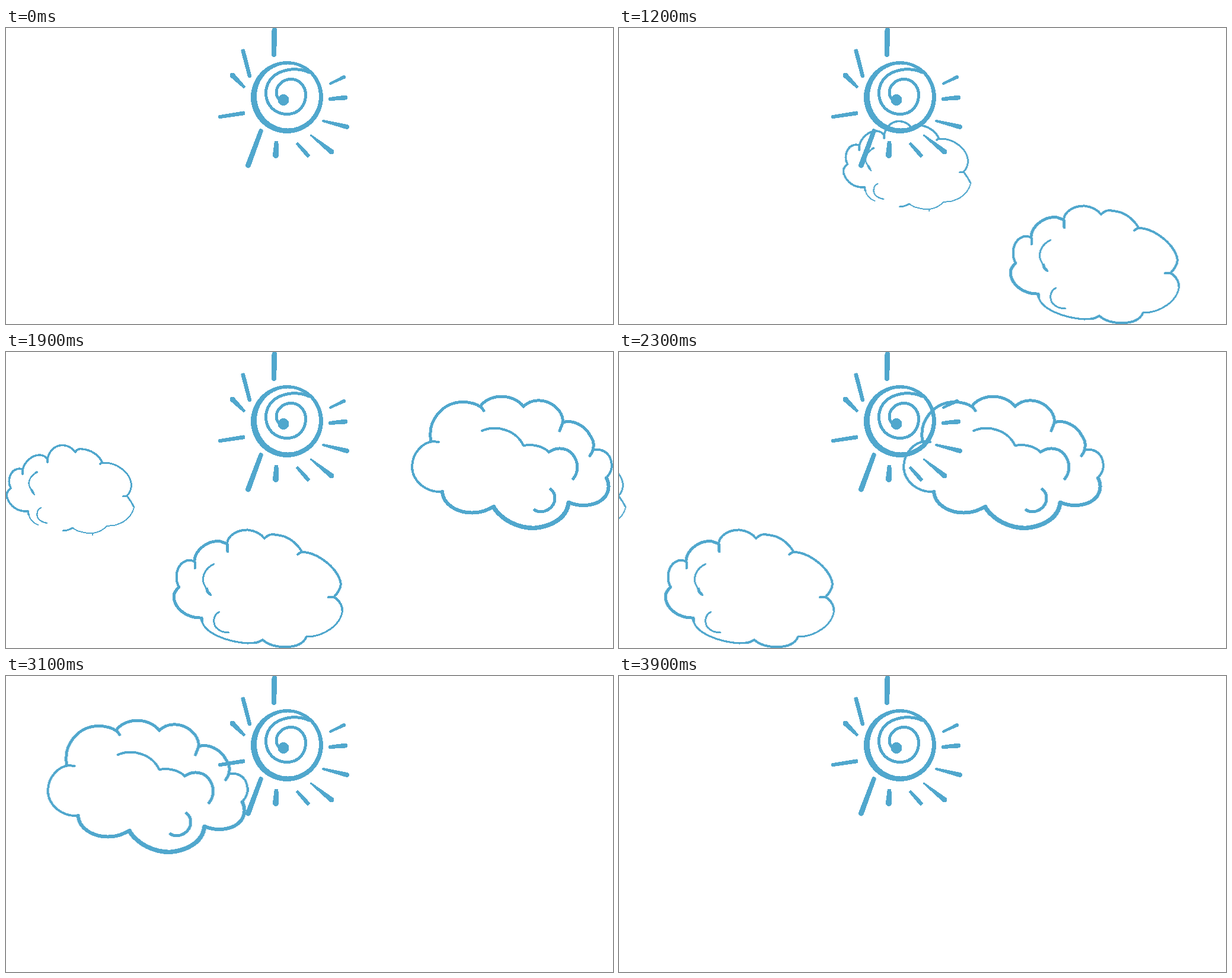
An HTML page for the animation above (4000 ms loop, 1024 by 500 pixels).

```html
<!DOCTYPE html>
<html lang="en">
<head>
<meta charset="utf-8">
<title>Sun and drifting clouds</title>
<style>
  html, body { margin: 0; width: 100%; height: 100%; overflow: hidden; background: #fff; }
  svg { display: block; width: 100vw; height: 100vh; }
  svg * { shape-rendering: crispEdges; }
  .ink { fill: none; stroke: #50a7cd; stroke-linecap: round; stroke-linejoin: round; }
  .solid { fill: #50a7cd; }

  /* One stage width in 19 steps, a second one in 20, then a short hold. */
  .sky { animation: drift 4s infinite; }
  @keyframes drift {
    0% { transform: translateX(1024px); animation-timing-function: steps(19, end); }
    47.5% { transform: translateX(0); animation-timing-function: steps(20, end); }
    97.5%, 100% { transform: translateX(-1024px); }
  }
</style>
</head>
<body>
<svg viewBox="0 0 1024 500" preserveAspectRatio="none">
  <g class="sun">
    <path class="solid" fill-rule="evenodd" d="M413 117a61 61 0 1 0 122 0a61 61 0 1 0 -122 0z
      M423 115.5a52.5 54 0 1 0 105 0a52.5 54 0 1 0 -105 0z"/>
    <path class="solid" d="M490 61L508 68L522 83L512 77L494 71L503 69z"/>
    <path class="ink" stroke-width="5" d="M511 75C500 69 481 68 467 73C448 79 438.500 94 438.500 110
      C438.500 131 454 145.500 474 145.500C494 145.500 505.500 131 505.500 113
      C505.500 97 494 86.500 481 86.500C466 86.500 456 98 456 109C456 114 458 118 462 121"/>
    <circle class="solid" cx="468" cy="121.500" r="9.500"/>
    <path class="solid" id="rays"/>
  </g>

  <g class="sky">
    <g class="ink small">
      <g stroke-width="3.500">
        <path d="M37 269C21 270 7 262 2 246C0 239 3 234 8 230M8 230C2 218 6 198 23 197L28 198L28 206"/>
        <path d="M28 200C31 184 45 174 57 174C63 174 67 177 70 181L70 186"/>
        <path d="M70 182C72 166 84 157 96 157.500C105 158 111 161 117 169
          C120 164 124 163 128 164C143 165 157 174 162 186L159 189"/>
        <path d="M37 269L38 274M1.500 237L1.500 247"/>
      </g>
      <g stroke-width="3">
        <path d="M159 188C182 183 211 202 211.500 226C211 234 208 239 204 243L197 244"/>
        <path d="M204 243C208 248 212 254 216 262"/>
        <path d="M96 302C104 302 108 299 113 297"/>
      </g>
      <path stroke-width="2" d="M216 262C213 276 202 287 188 291M186 292C180 294 175 293 170 294
        C160 305 145 309 128 304C122 303 117 301 113 297M146 306L146 309"/>
      <path stroke-width="2" d="M38 274C40 281 45 289 54 292"/>
      <path stroke-width="2.500" d="M51 204C43 208 37 217 39 225C40 231 45 234 44 236L48 241"/>
      <path stroke-width="4" d="M50 204L52 203M43 233L46 238"/>
      <path stroke-width="2.200" d="M59 263C51 267 51 277 55 282C59 287 64 288 69 289"/>
    </g>

    <g class="ink medium">
      <g stroke-width="5">
        <path d="M330 449C306 450 284 434 283 413C283 406 288 401 292 397M330 449L331 455"/>
        <path d="M318 352C319 335 340 317 362 320L373 324L374 337"/>
      </g>
      <g stroke-width="4">
        <path d="M292 397C281 379 291 349 313 352L319 355L319 365"/>
        <path d="M373 324C374 309 392 300 408 300.500C421 302 430 307 436 315
          C442 308 448 307 456 309C475 310 490 322 499 337L492 342"/>
        <path d="M496 339C516 333 561 362 565 392C564 401 559 408 553 414L544 414"/>
        <path d="M553 414C561 418 567 427 567.500 437"/>
        <path d="M507 481C502 492 490 498 473 498C456 499 441 494 433 486C429 489 424 491 419 491"/>
      </g>
      <path stroke-width="3" d="M567.500 437C565 461 536 481 507 481"/>
      <path stroke-width="3.200" d="M331 455C335 475 374 490 408 492L420 491"/>
      <path stroke-width="3" d="M351 358C336 365 331 378 333 389C334 395 339 398 338 403L346 411"/>
      <path stroke-width="4.500" d="M339 400L340 405L344 409"/>
      <path stroke-width="3" d="M360 439C349 444 349 458 354 465C360 472 368 474 376 474"/>
    </g>

    <g class="ink large">
      <g stroke-width="4">
        <path d="M730 152L720 151C703 153 685 170 685 195C686 216 706 238 736 236"/>
        <path d="M1013 212C1021 204 1024 193 1020 181C1016 169 1004 163 991 165"/>
        <path d="M803 133C829 122 861 133 873 158C891 155 907 160 916 169"/>
      </g>
      <g stroke-width="5">
        <path d="M985 175C992 166 994 153 986 142C976 123 956 114 939 119"/>
        <path d="M934 133L939 120C941 109 934 97 922 89C907 79 886 79 873 92
          C864 80 848 75 834 75C818 76 806 83 800 92"/>
        <path d="M806 99C799 87 780 84 768 84.500C736 86 710 116 717 151"/>
        <path d="M916 169C930 159 951 161 960 179C966 191 965 204 957 214"/>
        <path d="M919 232C929 240 929 257 915 266C907 271 898 271 892 267"/>
      </g>
      <g stroke-width="6">
        <path d="M736 236C737 256 759 271 785 271.500C803 272 813 266 823 261"/>
        <path d="M950 254C970 263 999 260 1011 244C1018 234 1018 222 1013 213"/>
      </g>
      <path stroke-width="7.500" d="M823 263C837 284 863 297 890 297.500C921 295 946 280 949 255"/>
    </g>
  </g>
</svg>
<script>
  // Each ray: x, y, width at one end, then at the other.
  const rays = [
    [453, 4, 9, 452, 45, 8],
    [400, 39, 7, 411, 81, 6.5],
    [382, 80, 9, 401, 99, 5],
    [361, 150, 6, 400, 144, 7],
    [430, 174, 7.5, 408.5, 232, 9],
    [456, 194, 7, 455, 215, 10],
    [492, 196, 5, 509, 215, 7],
    [514, 181, 3, 549, 209, 9],
    [535, 157, 4, 575, 167, 8],
    [547, 120, 6, 572, 117.5, 8],
    [547, 94, 4, 570, 83, 6]
  ];

  function taper([x1, y1, w1, x2, y2, w2]) {
    const len = Math.hypot(x2 - x1, y2 - y1);
    const nx = (y2 - y1) / len, ny = (x1 - x2) / len;
    const r1 = w1 / 2, r2 = w2 / 2;
    const at = (x, y, r) => `${x + nx * r} ${y + ny * r}`;
    return `M${at(x1, y1, r1)}L${at(x2, y2, r2)}A${r2} ${r2} 0 0 1 ${at(x2, y2, -r2)}` +
      `L${at(x1, y1, -r1)}A${r1} ${r1} 0 0 1 ${at(x1, y1, r1)}z`;
  }

  document.getElementById("rays").setAttribute("d", rays.map(taper).join(""));
</script>
</body>
</html>
```
